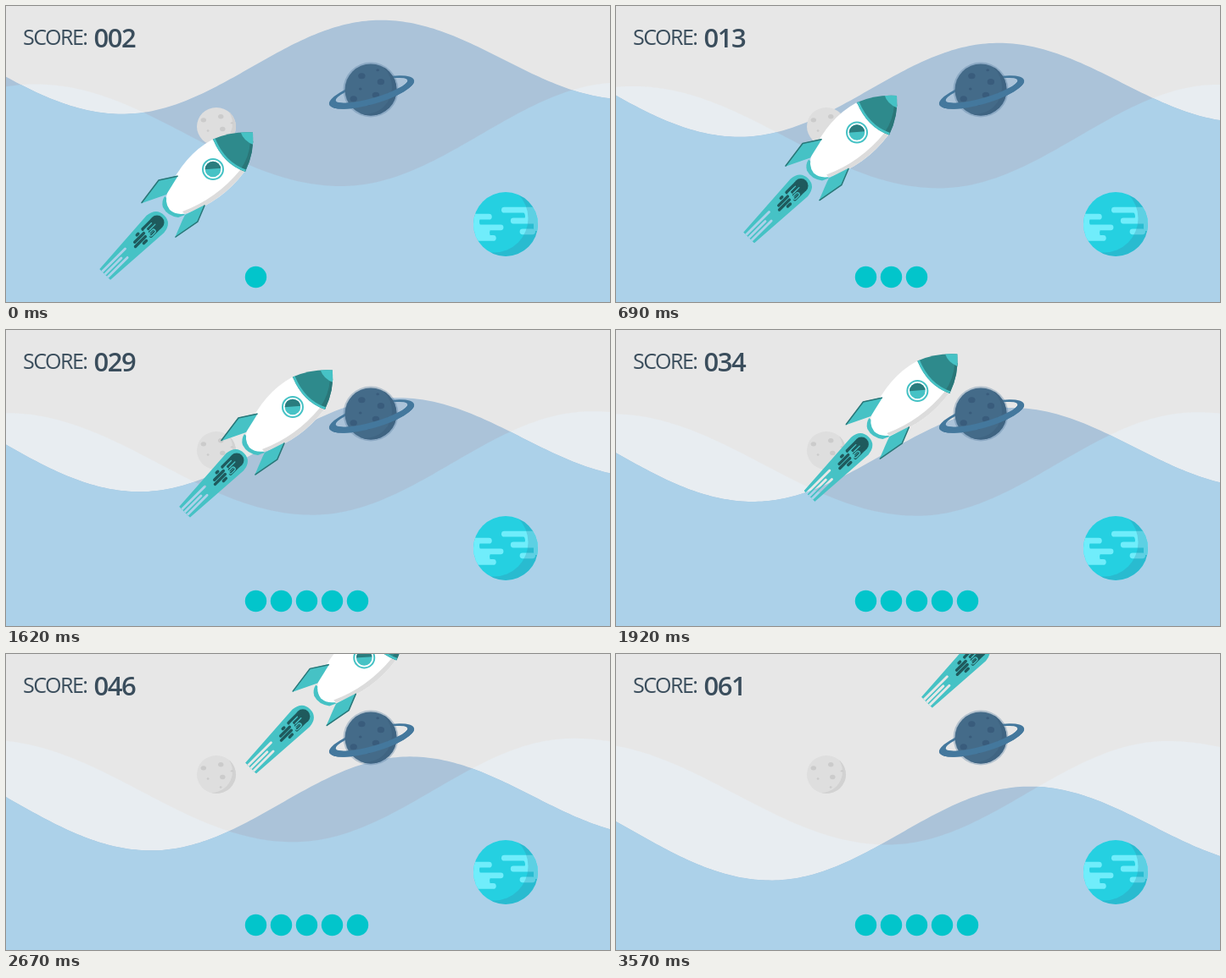
An HTML page with a canvas for the animation above (3.6 s loop, 712x350 px).

```html
<!DOCTYPE html>
<html lang="en">
<head>
<meta charset="utf-8">
<title>Rocket score</title>
<style>
  html, body { margin: 0; width: 100%; height: 100%; overflow: hidden; background: #e7e7e7; }
  canvas { display: block; }
</style>
</head>
<body>
<canvas id="stage" width="712" height="350"></canvas>
<script>
const W = 712, H = 350, STEP = 30, STEPS = 120;
const ctx = document.getElementById('stage').getContext('2d');
const TEAL = '#46c2c5', DEEP = '#2e8a8c', SHADE = '#2a7678', INK = '#1f5a5d';

// Crests and troughs, joined by half cosines.
const FRONT = [[-193, 8.2], [137, 127.7], [442, 16.7], [732, 110.3]];
const BACK = [[-325, 213], [35, 92.5], [395, 213], [725, 90.5], [1125, 213]];

function fill(color, path, rule = 'nonzero') {
  ctx.fillStyle = color;
  ctx.fill(path, rule);
}

function shape(d) {
  return new Path2D(d);
}

function disc(x, y, rx, ry = rx, turn = 0) {
  const p = new Path2D();
  p.ellipse(x, y, rx, ry, turn, 0, Math.PI * 2);
  return p;
}

function pill(x1, x2, y, height) {
  const p = new Path2D();
  p.roundRect(x1, y - height / 2, x2 - x1, height, height / 2);
  return p;
}

function line(color, width, path, cap = 'round') {
  ctx.strokeStyle = color;
  ctx.lineWidth = width;
  ctx.lineCap = cap;
  ctx.lineJoin = 'round';
  ctx.stroke(path);
}

function clipped(path, draw) {
  ctx.save();
  ctx.clip(path);
  draw();
  ctx.restore();
}

// Shades the part of a globe that lies outside the lit disc.
function crescent(globe, lit, color) {
  const outside = new Path2D();
  outside.rect(0, 0, W, H);
  outside.addPath(lit);
  clipped(globe, () => fill(color, outside, 'evenodd'));
}

// Craters on a golden-angle spiral, large and small in turn.
function craters(globe, x, y, radius, count, phase, color) {
  clipped(globe, () => {
    for (let i = 1; i <= count; i++) {
      const angle = phase + i * 2.4, far = radius * Math.sqrt(i / count) * 0.82;
      const size = radius * (i % 2 ? 0.14 : 0.06);
      fill(color, disc(x + far * Math.cos(angle), y + far * Math.sin(angle), size, size * 0.85));
    }
  });
}

function heightAt(points, x) {
  let i = 0;
  while (i < points.length - 2 && x > points[i + 1][0]) i++;
  const [x0, y0] = points[i], [x1, y1] = points[i + 1];
  return y0 + (y1 - y0) * (1 - Math.cos(Math.PI * (x - x0) / (x1 - x0))) / 2;
}

function wave(points, dx, dy) {
  const p = new Path2D();
  p.moveTo(0, H);
  for (let x = 0; x <= W; x += 4) p.lineTo(x, heightAt(points, x - dx) + dy);
  p.lineTo(W, H);
  p.closePath();
  return p;
}

function drawWaves(t) {
  const front = wave(FRONT, t * 0.0128, t * 0.0392);
  const back = wave(BACK, -t * 0.021, t * 0.0035);
  fill('#e8edf1', back);
  fill('#abc3d9', front);
  clipped(front, () => fill('#acd1e9', back));
}

const moon = disc(248, 142.5, 23, 22.5);

function drawMoon() {
  fill('#dedede', moon);
  crescent(moon, disc(242, 139, 25), '#d2d2d2');
  craters(moon, 248, 143, 23, 6, 4.2, '#cbcbcb');
}

const ringed = disc(430, 99, 30.5);
const ring = disc(431, 102, 52, 14, -0.28);
ring.addPath(disc(431, 99.8, 44, 9, -0.28));

function drawRing() {
  fill('#44789d', ring, 'evenodd');
}

function drawRingedPlanet() {
  drawRing();
  fill('rgba(80,120,155,.35)', disc(430, 99, 32.5));
  fill('#446b89', ringed);
  crescent(ringed, disc(423, 96, 32), '#3f6482');
  craters(ringed, 430, 99, 30, 8, 4.7, '#395c7c');
  clipped(shape('M371 119.2L491 84.7V135H371Z'), drawRing);
}

const globe = disc(589, 258, 38);

function drawCyanPlanet() {
  const light = '#70edfb';
  fill('#25d0e1', globe);
  clipped(globe, () => {
    for (let k = 0; k < 3; k++) {
      fill(light, pill(530, 579 + 8 * Math.sin(2.1 * k - 0.9), 249.2 + 12.6 * k, 6.8));
      fill(light, pill(584 + 10.8 * k, 640 - 8 * k, 241.2 + 12.8 * k, 6.8));
    }
    fill(light, shape('M548 249H561Q558 251 558 255T561 261H573Q570 264 570 268T573 275H548Z'));
    fill(light, shape('M609 243H640V266H622V256H609Q612 253 612 249T609 243Z'));
  });
  crescent(globe, disc(575, 251, 40.5), 'rgba(50,140,170,.3)');
}

function drawDots(score) {
  const count = Math.min(5, 1 + Math.floor(score / 5));
  for (let i = 0; i < count; i++) fill('#02c5cb', disc(294.5 + 30 * i, 320.5, 12.7));
}

// The flame lies along +x with its round head at the left; the gaps are cut out.
const flame = shape('M3 14.5L87 9V-9L3 -14.5Q-12 -13 -12 0T3 14.5Z');
for (let k = 0; k < 3; k++) {
  flame.addPath(pill(47 + 5.5 * (2 * k % 3), 92, 4.6 - 4.6 * k, 2.9));
}

function drawFlame() {
  ctx.translate(178, 256);
  ctx.rotate(Math.PI * 0.75);
  clipped(shape('M-16 -16H87V16H-16Z'), () => fill(TEAL, flame, 'evenodd'));
  fill(INK, disc(0, 0, 8.5));
  for (let k = 0; k < 4; k++) {
    const v = 6.3 - 4.2 * k;
    const split = 16 + 4 * Math.sin(2.6 * k + 1), end = 35 + 6 * Math.sin(1.9 * k - 1.6);
    fill(INK, pill(0, split, v, 3.8));
    fill(INK, pill(split + 4, end, v, 3.4));
  }
  line(TEAL, 1.3, pill(8, 17, -4.5, 4.5));
  line(TEAL, 1.3, shape('M3 0H12M5 4.2H17'));
}

const body = shape('M243 158Q210 176 191 218Q186 232 193 241Q201 248 213 245Q254 232 281 196Z');
const cone = shape('M244 157.5Q266 148 291 149.5Q293 173 282 196Q256 187 244 157.5Z');

function drawFin(blade, edge) {
  fill(TEAL, shape(blade));
  line(SHADE, 1.5, shape(edge));
}

function drawRocket() {
  fill(TEAL, shape('M187 225Q183 231 185 238Q190 248 203 250L211 247Z'));
  fill('#fff', body);
  clipped(body, () => fill('#dcdcdc', shape('M276 194Q248 228 208 243L214 250L290 210V193Z')));
  drawFin('M203 200.5L180 205.5L159 233.5L189 223Z', 'M160 232.5L180 206L202 201.3');
  drawFin('M211 247L234.5 235L226 255.5L199 274L208.5 252Z', 'M234 236L225.8 255.2L200 273');

  fill(DEEP, cone);
  clipped(cone, () => {
    fill(SHADE, shape('M288 160Q287 178 276 194L295 200V160Z'));
    fill(TEAL, shape('M276 147Q279 160 294 165V145Z'));
    line(TEAL, 5.5, shape('M244 157.5Q256 187 282 196'), 'butt');
  });

  const pane = disc(244, 193, 9.3);
  fill('#fff', disc(244, 193, 12.5));
  line(TEAL, 2, disc(244, 193, 12));
  fill(TEAL, pane);
  clipped(pane, () => fill('#2a7c7e', shape('M230 193.5L258 191.5V180H230Z')));
}

function write(text, x, y, weight, size) {
  ctx.font = `${weight} ${size}px "Open Sans", "Noto Sans", sans-serif`;
  ctx.letterSpacing = '-1.5px';
  ctx.fillStyle = '#3a4d5c';
  ctx.fillText(text, x, y);
}

function drawScore(score) {
  write('SCORE:', 20, 46, 500, 25);
  write(String(score).padStart(3, '0'), 103.5, 48.5, 600, 31);
}

// Steady climb, then a faster run once the boost starts.
function climb(t, boost) {
  const early = Math.min(t, 2070), late = t - early;
  return [early * 0.058 + late * boost, -early * 0.063 - late * boost];
}

function moved([dx, dy], draw) {
  ctx.save();
  ctx.translate(dx, dy);
  draw();
  ctx.restore();
}

function render(t) {
  const score = 2 + Math.floor(t / 60);
  ctx.fillStyle = '#e7e7e7';
  ctx.fillRect(0, 0, W, H);
  drawWaves(t);
  drawMoon();
  drawRingedPlanet();
  drawCyanPlanet();
  drawDots(score);
  moved(climb(t, 0.0865), drawFlame);
  moved(climb(t, 0.097), drawRocket);
  drawScore(score);
}

const start = performance.now();
function tick() {
  const elapsed = Math.max(0, performance.now() - start);
  render(Math.floor(elapsed / STEP) % STEPS * STEP);
  requestAnimationFrame(tick);
}
tick();
</script>
</body>
</html>
```
